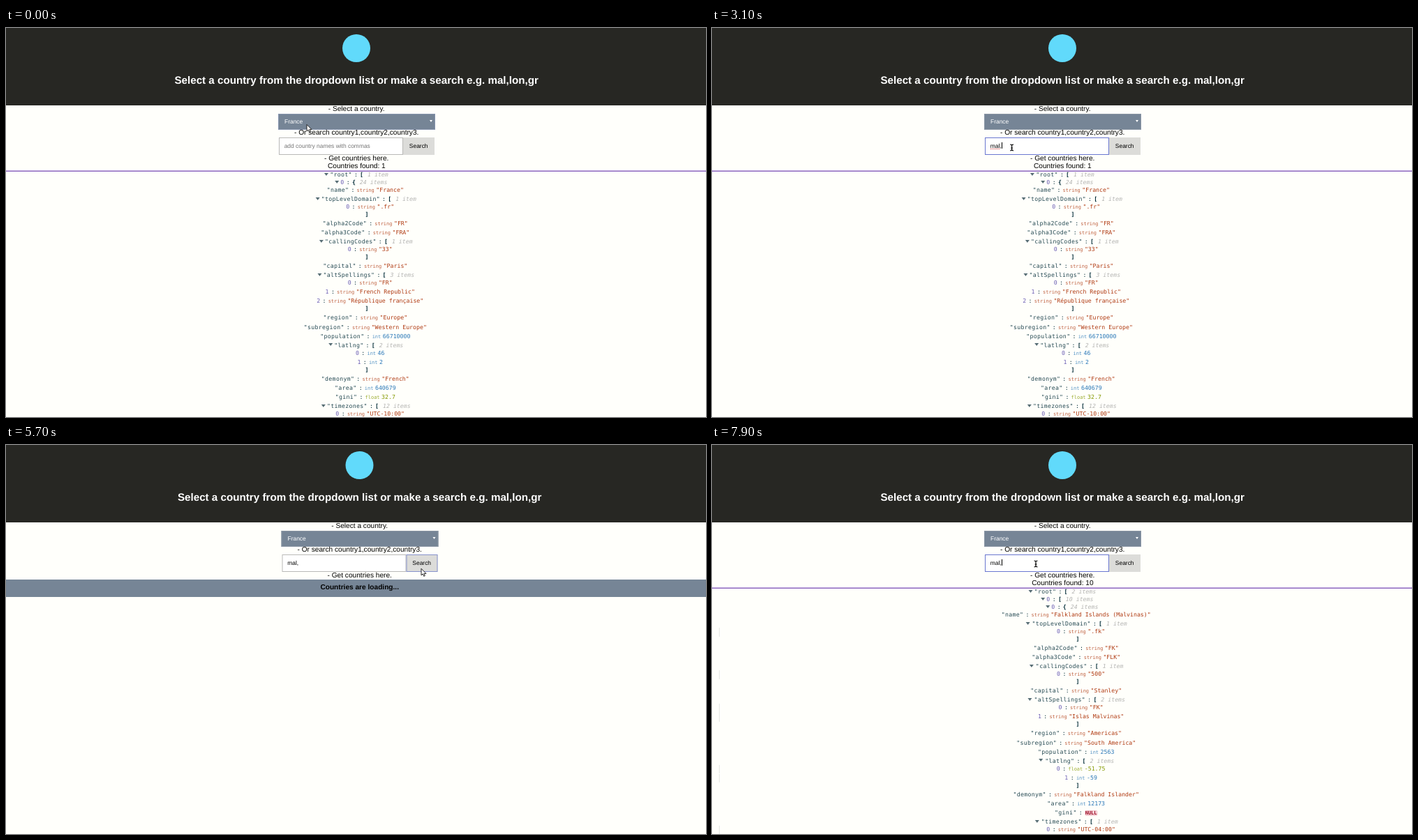
Animation, 1003 px wide and 558 px high, one loop 8000 ms. Source, as an HTML page:

```html
<!DOCTYPE html>
<html lang="en">
<head>
<meta charset="utf-8">
<title>Country search</title>
<style>
html, body { margin: 0; width: 100%; height: 100%; overflow: hidden; background: #fffffb; }
body { position: relative; font: 10.136px/1.2 "Liberation Sans", Arial, sans-serif; color: #000;
  text-rendering: geometricPrecision; }
div, svg { position: absolute; }
.c, .l { white-space: pre; transform: translate(-50%, -50%); }
.l { transform: translate(0, -50%); }
.small, .l { font-size: 8.44px; }
.full { left: 0; width: 100%; }
#page { left: 0; top: 0; width: 1003px; height: 558px; }
#head { top: 0; height: 111px; background: #272723; }
#logo { left: 482px; top: 8.7px; width: 40px; height: 40px; border-radius: 50%; background: #61dafb; }
#select { left: 390px; top: 123px; width: 225px; height: 22.5px; background: #768596;
  border: 1px solid #8a96a4; box-sizing: border-box; }
#select.on { border-color: #8795ae; }
#tick { left: 607px; top: 132.3px; border: 2px solid transparent; border-top: 3.5px solid #fff; border-bottom: 0; }
#input { left: 390.6px; top: 156.8px; width: 178.6px; height: 25.2px; box-sizing: border-box;
  background: #fff; border: 1px solid #b9b9b7; }
#input.on { border-color: #6a77d0; }
#button { left: 569px; top: 156.8px; width: 45px; height: 25px; box-sizing: border-box;
  background: #dcdcd9; border: 1px solid #dcdcd9; }
#button.on { border-color: #8792cc; }
#typed .bad { text-decoration: underline dotted #d42a2a 1px; text-underline-offset: 1.2px; }
#caret { display: inline-block; width: .9px; margin: 0 -1.4px 0 .5px; height: 9px; vertical-align: -1.8px; background: #000; }
#rule { top: 204px; height: 2px; background: linear-gradient(#c9b4e0 50%, #8a63bd 50%); }
#bar { top: 193.4px; height: 24.2px; background: #768596; }
.tree { left: 0; top: 0; font: 8.236px/1.2 "DejaVu Sans Mono", monospace; }
.tree span { display: inline-block; }
.key { letter-spacing: .317px; color: #264a54; }
.index { color: #6c5fb4; }
.colon { margin: 0 3.17px; color: #002b36; }
.brace { font-weight: bold; color: #002b36; }
.count { margin-left: 6px; font-style: italic; color: #b4b4b2; }
.arrow { width: 0; border: 3.2px solid transparent; border-top: 4.2px solid #586e75; border-bottom: 0;
  margin-right: 2.6px; vertical-align: 1.2px; }
.type { font-size: 6.97px; margin-right: 2.53px; opacity: .8; }
.string { color: #b03a12; }
.int { color: #2a78b8; }
.float { color: #859900; }
.null { font-size: 6.97px; font-weight: bold; color: #a0142c; background: #f3cdd3; padding: 0 .8px; border-radius: 2px; }
.edge { left: 9.7px; width: 1px; background: #e7e9e4; }
.copy { width: 7.5px; height: 8px; margin-left: 3.5px; border: 1px solid #4a7fa8; border-top-width: 2px;
  box-sizing: border-box; vertical-align: -.5px;
  background: linear-gradient(90deg, transparent 50%, #8fb3cc 50%); }
#pointer { left: 0; top: 0; overflow: visible; }
#pointer path { stroke: #111; stroke-width: .9; fill: #fff; }
</style>
</head>
<body>
<div id="head" class="full"></div>
<div id="rule" class="full"></div>
<div id="bar" class="full"></div>
<div id="page">
  <div id="logo"></div>
  <div class="c" style="left:502.2px;top:75.9px;font-size:15.2px;font-weight:bold;color:#fff">Select a country from the dropdown list or make a search e.g. mal,lon,gr</div>
  <div class="c" style="left:502.2px;top:116.9px">- Select a country.</div>
  <div id="select"></div>
  <div class="l" style="left:399px;top:134px;color:#fff">France</div>
  <div id="tick"></div>
  <div class="c" style="left:502.2px;top:150.9px">- Or search country1,country2,country3.</div>
  <div id="input"></div>
  <div id="hint" class="l" style="left:398.7px;top:168.7px;color:#757575">add country names with commas</div>
  <div class="l" style="left:398.7px;top:168.7px"><span id="typed"><span id="word"></span><span id="rest"></span></span><span id="caret"></span></div>
  <div id="button"></div>
  <div class="c small" style="left:591.2px;top:168.7px">Search</div>
  <div class="c" style="left:502.2px;top:187.9px">- Get countries here.</div>
  <div id="found" class="c" style="left:502.4px;top:198.9px"></div>
  <div id="loading" class="c" style="left:502.2px;top:204.9px;font-weight:bold">Countries are loading...</div>
</div>
<svg id="pointer" width="1" height="1">
  <path id="arrow" d="M0 0V9.6L2.2 7.6 3.7 11 5.3 10.3 3.9 7.1H7Z"/>
  <path id="beam" style="fill:none;stroke-width:1.3" d="M-2.4-4.3Q0-4.3 0-3V3Q0 4.3-2.4 4.3M2.4-4.3Q0-4.3 0-3V3Q0 4.3 2.4 4.3M-1.3 .6H1.3"/>
  <path id="hand" d="M0 0C.9 0 1 .7 1 1.3V3.7L5 4.5C6 4.8 6.3 5.5 6.2 6.5L5.7 9.8H1.2L-1.9 6.2C-2.4 5.4-1.6 4.8-.9 5.3V1.3C-.9 .7-.8 0 0 0Z"/>
</svg>
<script>
const $ = id => document.getElementById(id);
const span = (cls, text = '') => `<span class="${cls}">${text}</span>`;
const show = (el, on) => el.style.display = on ? '' : 'none';

function firstOf(total, ...shown) {
  shown.length = total;
  return shown;
}

const france = {
  name: 'France', topLevelDomain: ['.fr'], alpha2Code: 'FR', alpha3Code: 'FRA',
  callingCodes: ['33'], capital: 'Paris',
  altSpellings: ['FR', 'French Republic', 'République française'],
  region: 'Europe', subregion: 'Western Europe', population: 66710000, latlng: [46, 2],
  demonym: 'French', area: 640679, gini: 32.7, timezones: firstOf(12, 'UTC-10:00')
};
const falklands = {
  name: 'Falkland Islands (Malvinas)', topLevelDomain: ['.fk'], alpha2Code: 'FK', alpha3Code: 'FLK',
  callingCodes: ['500'], capital: 'Stanley', altSpellings: ['FK', 'Islas Malvinas'],
  region: 'Americas', subregion: 'South America', population: 2563, latlng: [-51.75, -59],
  demonym: 'Falkland Islander', area: 12173, gini: null, timezones: ['UTC-04:00']
};

// Lays out a centred JSON tree; each nesting level moves the centre right.
function buildTree(data, lists) {
  const tree = document.createElement('div');
  const body = document.createElement('div');
  tree.className = 'tree';
  tree.append(body);
  let y = 210.8, opened = false, first = true;

  function row(html, x, depth, closing) {
    if (!first) y += opened || closing ? 11.05 : 13.03;
    const el = document.createElement('div');
    el.className = 'c';
    el.style.cssText = `left:${x + depth * 6.9}px;top:${y}px`;
    el.innerHTML = html;
    (first ? tree : body).append(el);
    first = opened = false;
  }
  const label = key => (isNaN(key) ? span('key', `"${key}"`) : span('key index', key)) + span('colon', ':');

  function open(depth, key, brace, count) {
    const size = count + (count > 1 ? ' items' : ' item');
    const copy = depth ? '' : span('copy');
    row(span('arrow') + label(key) + span('brace', brace) + span('count', size) + copy, 501.7, depth);
    opened = true;
  }
  function leaf(depth, key, value) {
    const type = typeof value == 'string' ? 'string' : Number.isInteger(value) ? 'int' : 'float';
    const text = type == 'string' ? `"${value}"` : value;
    row(label(key) + (value === null ? span('null', 'NULL') :
      span('type ' + type, type) + span(type, text)), 501, depth);
    if (depth > 3) {
      const edge = document.createElement('div');
      edge.className = 'edge';
      edge.style.cssText = `top:${y - 6}px;height:12.5px`;
      body.append(edge);
    }
  }

  lists.forEach((count, depth) => open(depth, depth ? 0 : 'root', '[', count));
  const d = lists.length;
  open(d, 0, '{', 24);
  for (const [key, value] of Object.entries(data)) {
    if (!Array.isArray(value)) { leaf(d + 1, key, value); continue; }
    open(d + 1, key, '[', value.length);
    value.forEach((item, i) => leaf(d + 2, i, item));
    if (key != 'timezones') row(span('brace', ']'), 503.2, d + 1, true);
  }
  document.body.insertBefore(tree, $('pointer'));
  return { tree, body, copy: tree.querySelector('.copy') };
}

const before = buildTree(france, [1]);
const after = buildTree(falklands, [2, 10]);
show(before.copy, false);

const path = [[0, 431, 138.5], [200, 431, 138.5], [600, 430, 171.5], [1900, 430, 171.5],
  [2000, 429.6, 171.5], [3150, 429.6, 171.5], [3600, 553, 174.3], [3900, 595, 177.3],
  [6350, 595, 177.3], [6750, 560, 209], [7300, 560, 209], [7650, 464, 170.5], [8000, 464, 170.5]];
const keys = [[1800, 'm'], [2100, 'ma'], [2350, 'mal'], [2650, 'mal,']];

function pointerAt(t) {
  const i = path.findIndex(p => p[0] > t);
  const [t0, x0, y0] = path[i - 1], [t1, x1, y1] = path[i];
  const u = (t - t0) / (t1 - t0), e = u * u * (3 - 2 * u);
  return [x0 + (x1 - x0) * e, y0 + (y1 - y0) * e];
}

function draw(t) {
  const loading = t >= 4400 && t < 5900, done = t >= 5900;
  const typing = t >= 700 && t < 4000 || t >= 7700;
  const [x, y] = pointerAt(t);
  const hover = done && y > 205.5;

  $('page').style.transform = `translateX(${loading ? 4.5 : 0}px)`;
  show($('bar'), loading);
  show($('loading'), loading);
  show($('rule'), !loading);
  show($('found'), !loading);
  $('found').textContent = 'Countries found: ' + (done ? 10 : 1);
  show(before.tree, !loading && !done);
  show(after.tree, done);
  show(after.copy, hover);
  after.body.style.transform = `translateY(${hover ? .6 : 0}px)`;

  $('select').classList.toggle('on', t < 700);
  $('input').classList.toggle('on', typing);
  $('button').classList.toggle('on', t >= 4000 && t < 7700);

  const last = keys.filter(k => k[0] <= t).pop() || [700, ''];
  show($('hint'), !last[1]);
  $('word').textContent = last[1].slice(0, 3);
  $('rest').textContent = last[1].slice(3);
  $('word').className = typing && t >= 2650 && t < 4000 ? 'bad' : '';
  const since = t - (t >= 7700 ? 7700 : last[0]);
  $('caret').style.visibility = typing && since % 1000 < 500 ? 'visible' : 'hidden';

  const inInput = x > 391 && x < 569 && y > 157 && y < 182;
  const shape = inInput ? 'beam' : hover ? 'hand' : 'arrow';
  for (const id of ['arrow', 'beam', 'hand']) show($(id), id == shape);
  $('pointer').style.transform = `translate(${x}px, ${y}px)`;
}

const start = performance.now();
function tick() {
  draw((performance.now() - start) % 8000);
  requestAnimationFrame(tick);
}
tick();
</script>
</body>
</html>
```
